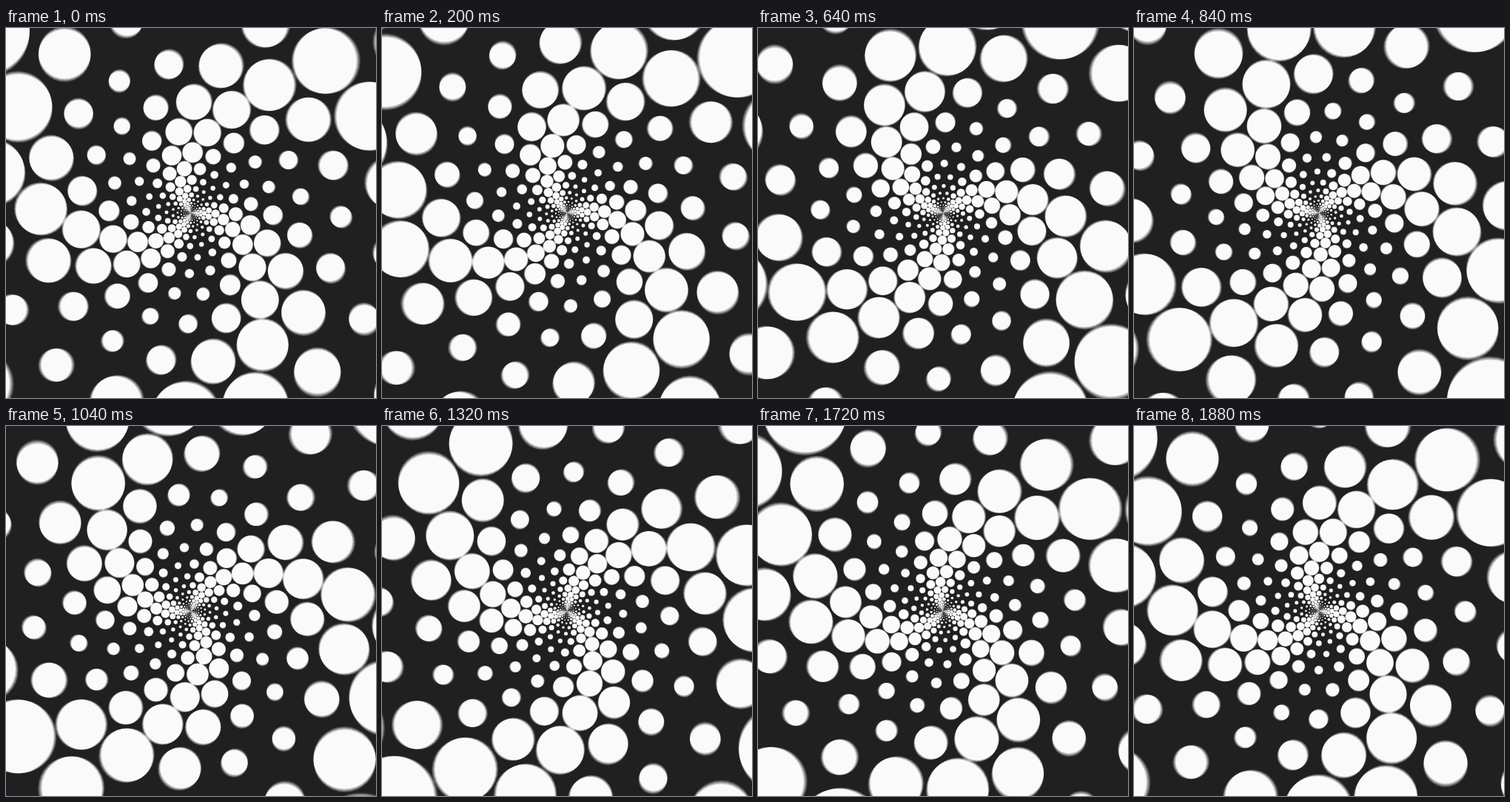
An HTML page with a canvas that plays this animation: 500x500 px, repeating every 1920 ms.

```html
<!DOCTYPE html>
<html lang="en">
<head>
<meta charset="utf-8">
<title>Spiral dots</title>
<style>
  html, body { margin: 0; width: 100%; height: 100%; overflow: hidden; background: #202020; }
  canvas { display: block; width: 500px; height: 500px; }
</style>
</head>
<body>
<canvas id="stage" width="500" height="500"></canvas>
<script>
const ctx = document.getElementById('stage').getContext('2d');
const TAU = 2 * Math.PI;
const DEG = Math.PI / 180;

const LOOP = 1920, STEP = 40, STEPS = LOOP / STEP;
const SAMPLES = 8, SHUTTER = 0.6;
const BACK = 32, FRONT = 250;

// Hexagonal lattice in log-polar space
const PER_RING = 18;
const SPACING = TAU / PER_RING;
const RING_GAP = SPACING * Math.sqrt(3) / 2;
const RINGS_PER_LOOP = 4;
const BASE_RADIUS = 202.8;
const BASE_ANGLE = 1.5 * DEG;
const TURN = 60 * DEG;

// Three-armed wave that sets the dot size
function dotSize(radius, angle, t) {
  const peak = (0.313 * radius - 1.8 - 120 * t) * DEG;
  return radius * (0.1221 + 0.0506 * Math.cos(3 * (angle - peak)));
}

function addDots(t, level) {
  ctx.fillStyle = `rgb(${level},${level},${level})`;
  for (let ring = -24; ring <= 3; ring++) {
    const radius = BASE_RADIUS * Math.exp(RING_GAP * (ring + RINGS_PER_LOOP * t));
    if (radius > 440) break;
    for (let i = 0; i < PER_RING; i++) {
      const angle = BASE_ANGLE + TURN * t + SPACING * (i + ring / 2);
      ctx.beginPath();
      ctx.arc(250 + radius * Math.cos(angle), 250 + radius * Math.sin(angle),
        dotSize(radius, angle, t), 0, TAU);
      ctx.fill();
    }
  }
}

// Averages several moments within the shutter for motion blur
function render(ms) {
  const step = Math.floor((ms % LOOP) / STEP);
  ctx.globalCompositeOperation = 'source-over';
  ctx.fillStyle = `rgb(${BACK},${BACK},${BACK})`;
  ctx.fillRect(0, 0, 500, 500);
  ctx.globalCompositeOperation = 'lighter';
  const share = n => Math.round((FRONT - BACK) * n / SAMPLES);
  for (let s = 0; s < SAMPLES; s++) {
    const offset = SHUTTER * ((s + 0.5) / SAMPLES - 0.5);
    addDots((step + offset) / STEPS, share(s + 1) - share(s));
  }
}

const start = performance.now();
function tick() {
  render(performance.now() - start);
  requestAnimationFrame(tick);
}
tick();
</script>
</body>
</html>
```
